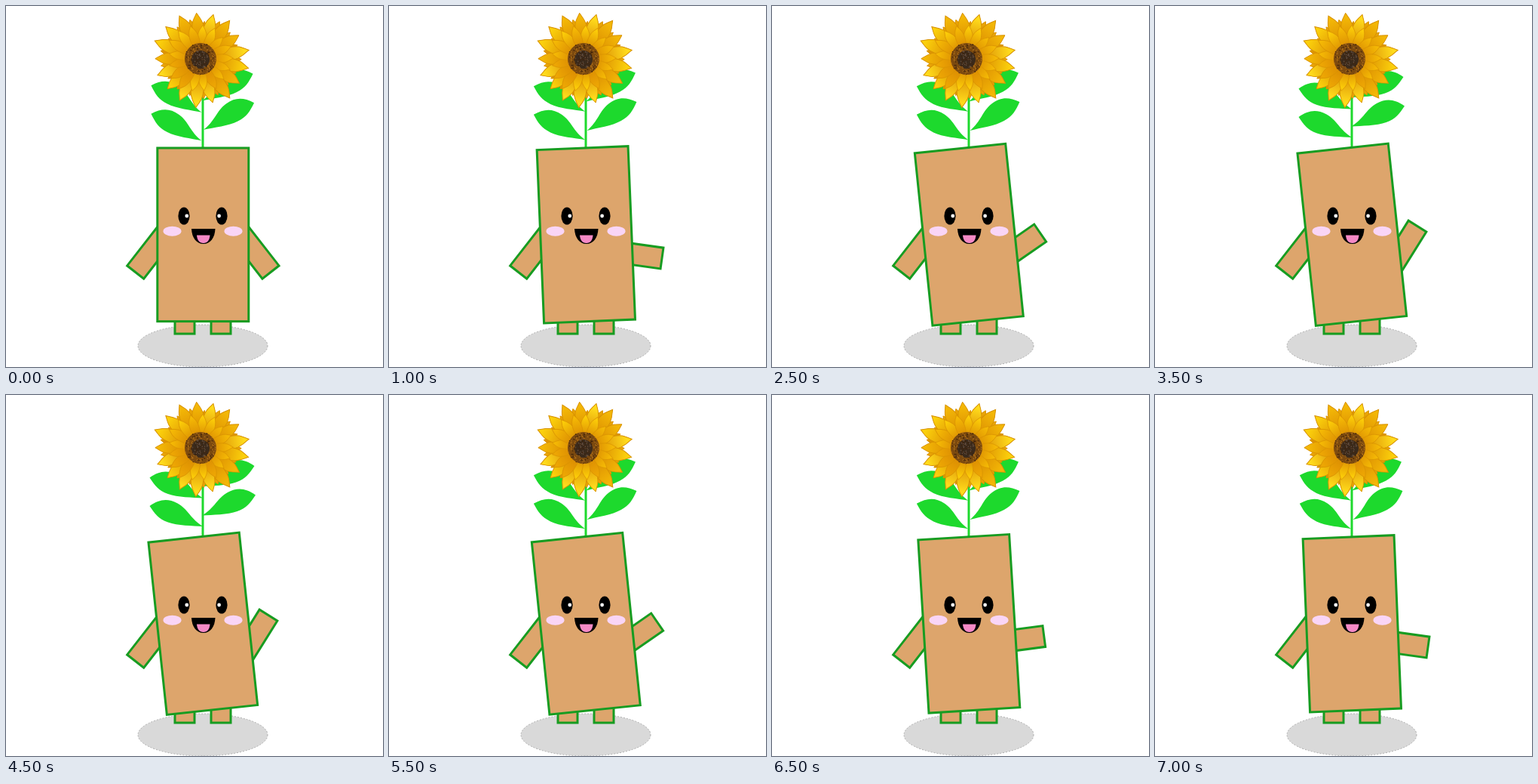
An HTML page with a canvas that plays this animation: 500 px wide and 478 px high, repeating every 7.5 s.

```html
<!DOCTYPE html>
<html lang="en">
<head>
<meta charset="utf-8">
<title>Waving flower pot</title>
<style>
html, body { margin: 0; width: 100%; height: 100%; overflow: hidden; background: #fff; }
canvas { display: block; }
</style>
</head>
<body>
<canvas id="stage" width="500" height="478"></canvas>
<script>
const ctx = document.getElementById('stage').getContext('2d');
const STEP = 500, STEPS = 15, TOP = 7;
const CLAY = '#dda56c', EDGE = '#179c21', LEAF = '#1dd92d';
const RAD = Math.PI / 180;

// Key poses of the waving hand, from hanging to fully up
const HAND = [
  { pose: 0, x: 351, y: 352.5, angle: 52 },
  { pose: 2, x: 362, y: 334, angle: 8 },
  { pose: 4, x: 359.5, y: 305, angle: -23 },
  { pose: TOP, x: 348, y: 291.5, angle: -58 }
];

// Unit-long outlines; the leaf is centred, the petal grows from its base
const LEAF_PATH = new Path2D('M-.5 0C-.25 .04 -.14 .19 .06 .215S.38 .17 .5 0C.36 -.1 .28 -.15 .1 -.15S-.32 -.05 -.5 0Z');
const PETAL_PATH = new Path2D('M0 0C.3 .1 .55 .17 .76 .12L.86 .08L1 0L.88 -.07C.75 -.15 .5 -.16 0 0Z');

function random(seed) {
  return () => (seed = seed * 16807 % 2147483647) / 2147483647;
}

function ellipse(x, y, rx, ry, fill) {
  ctx.beginPath();
  ctx.ellipse(x, y, rx, ry, 0, 0, Math.PI * 2);
  ctx.fillStyle = fill;
  ctx.fill();
}

function block(cx, cy, angle, x, y, w, h) {
  ctx.save();
  ctx.translate(cx, cy);
  ctx.rotate(angle * RAD);
  ctx.fillStyle = CLAY;
  ctx.strokeStyle = EDGE;
  ctx.lineWidth = 3;
  ctx.fillRect(x, y, w, h);
  ctx.strokeRect(x, y, w, h);
  ctx.restore();
}

const arm = (x, y, angle) => block(x, y, angle, -66, -14, 66, 28);

function place(path, x, y, angle, sx, sy, fill, line) {
  ctx.save();
  ctx.translate(x, y);
  ctx.scale(sx, sy);
  ctx.rotate(angle * RAD);
  ctx.fillStyle = fill;
  ctx.fill(path);
  if (line) {
    ctx.strokeStyle = line;
    ctx.lineWidth = 0.015;
    ctx.stroke(path);
  }
  ctx.restore();
}

function wave(pose) {
  const i = HAND.findIndex((key, n) => n && pose <= key.pose);
  const a = HAND[i - 1], b = HAND[i];
  const mix = name => a[name] + (b[name] - a[name]) * (pose - a.pose) / (b.pose - a.pose);
  arm(mix('x'), mix('y'), mix('angle'));
}

// Leaves first lean to one side, then droop on both
function plant(pose) {
  const lean = pose > 0 && pose < 6 ? 2 : 0;
  const droop = pose < 6 ? 0 : 7;
  ctx.fillStyle = LEAF;
  ctx.fillRect(259.5, 110, 3, 80);
  const leaf = (x, y, side) =>
    place(LEAF_PATH, x, y, 28 + side * lean - droop, side * 76, -76, LEAF);
  leaf(226, 123, -1);
  leaf(226, 160.5, -1);
  leaf(294, 107.5, 1);
  leaf(295.5, 146, 1);
}

function flower(cx, cy) {
  const next = random(29), count = 17;
  const ring = (length, spread, turn, colors) => {
    for (let i = 0; i < count; i++) {
      const size = length + spread * (next() - 0.5);
      const glow = ctx.createLinearGradient(0, 0, 1, 0);
      glow.addColorStop(0.3, '#d98a02');
      glow.addColorStop(0.9, colors[Math.floor(next() * colors.length)]);
      ctx.save();
      place(PETAL_PATH, cx, cy, turn + i * 360 / count, size, size, '#eba703');
      place(PETAL_PATH, cx, cy, turn + i * 360 / count, size, size, glow, '#d79103');
      ctx.restore();
    }
  };
  ring(53, 6, -84, ['#e9a405', '#dd9504']);
  ring(62, 7, -95, ['#fbd00c', '#f3b706', '#ffdb1c']);
  ring(45, 8, -86, ['#fbcb08', '#f4b805', '#eda604']);

  ellipse(cx, cy, 21, 21, '#7c4a0f');
  ellipse(cx, cy + 1, 12, 12, '#3a2a1c');
  for (let i = 0; i < 220; i++) {
    const r = 21 * Math.sqrt(next()), a = next() * Math.PI * 2;
    const bright = r > 12 ? '#b0701a' : '#665040';
    ellipse(cx + r * Math.cos(a), cy + r * Math.sin(a), 0.8, 0.8, next() < 0.5 ? bright : '#3f230b');
  }
}

function face() {
  for (const side of [-1, 1]) {
    ellipse(261 + side * 25, 278, 7.6, 11.5, '#000');
    ellipse(261.2 + side * 21.4, 278, 2.4, 2.4, '#fff');
    ellipse(261 + side * 40.5, 298.2, 12, 6.5, '#f9d5f6');
  }
  ctx.fillStyle = '#000';
  ctx.fill(new Path2D('M246 295H277.5C277 307 271 315 261.8 315S246.5 307 246 295Z'));
  ctx.fillStyle = '#f48ac6';
  ctx.fill(new Path2D('M253 303.5H270.5C270 310 267 314 261.8 314S253.5 310 253 303.5Z'));
}

function draw(pose) {
  ctx.fillStyle = '#fff';
  ctx.fillRect(0, 0, 500, 478);

  ellipse(261, 450, 86, 28, '#d9d9d9');
  ctx.strokeStyle = '#888';
  ctx.lineWidth = 0.6;
  ctx.setLineDash([2, 2]);
  ctx.stroke();
  ctx.setLineDash([]);

  block(224, 410, 0, 0, 0, 26, 24);
  block(272, 410, 0, 0, 0, 26, 24);
  arm(171.7, 352.5, 128);
  wave(pose);
  plant(pose);
  flower(258, 70);
  block(261.3, 302.8, Math.max(-1.18 * pose, -6.1), -60.5, -114.8, 121, 229.6);
  face();
}

let shown = -1;
function tick(now) {
  const k = Math.floor(now / STEP) % STEPS;
  // Rise, dip once at the top, then come back down
  const pose = k <= TOP ? k : k === TOP + 1 ? TOP - 1 : 2 * TOP + 2 - k;
  if (pose !== shown) draw(shown = pose);
  requestAnimationFrame(tick);
}
tick(performance.now());
</script>
</body>
</html>
```
